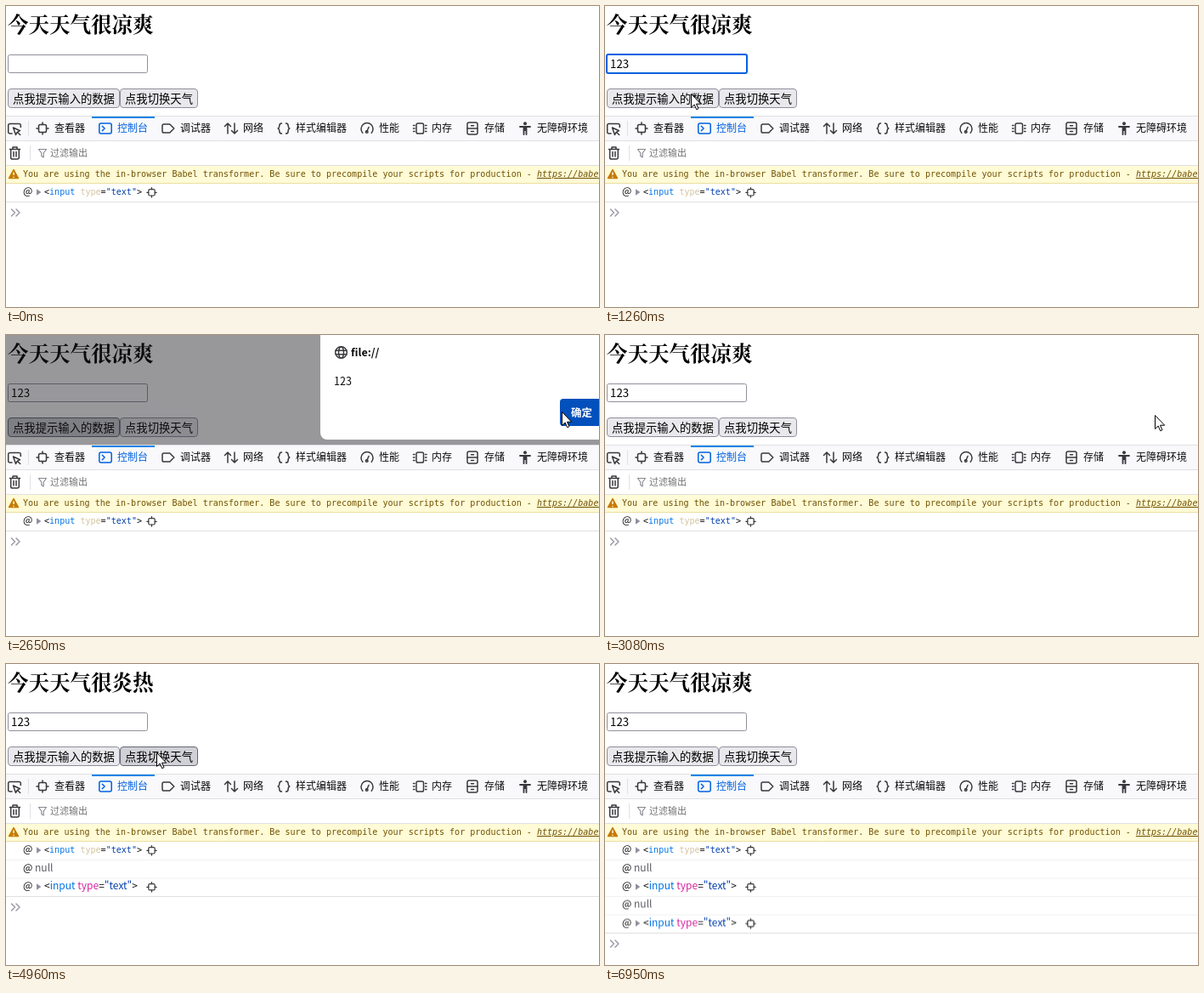
Recreate the animation shown at these times as an HTML page. Size 698 by 354 pixels, loop 7620 ms.

```html
<!DOCTYPE html>
<html lang="zh-CN">
<head>
<meta charset="utf-8">
<title>天气</title>
<style>
html, body { margin: 0; width: 100%; height: 100%; overflow: hidden; background: #fff; }
svg { display: block; }
text { font: 12px "Noto Sans CJK SC", "Noto Sans", sans-serif; fill: #0c0c0d; white-space: pre; }
.title { font: bold 24.5px "Noto Serif CJK SC", "Noto Sans CJK SC", serif; fill: #000; }
.form text { font-size: 13.333px; fill: #000; }
.mono text { font: 10.05px "DejaVu Sans Mono", monospace; }
.button { fill: #e9e9ed; stroke: #8f8f9d; }
.icon { fill: none; stroke: #38383d; stroke-width: 1.5; stroke-linecap: round; stroke-linejoin: round; }
.solid { fill: #38383d; stroke: none; }
.line { stroke: #e0e0e2; }
.faint { stroke: #f1f1f3; }
.tag { fill: #0074e8; }
.attr { fill: #d6249f; }
.pale { fill: #d3c4a0; }
.value { fill: #003eaa; }

/* one shared 7620 ms loop with hard changes */
.t { animation: 7620ms step-end infinite; }
.cursor { animation-name: cursor; }
.arrow { animation-name: arrow; }
.beam { animation-name: beam; }
.focus { animation-name: focus; }
.one { animation-name: one; }
.two { animation-name: two; }
.three { animation-name: three; }
.show { animation-name: show; }
.swap { animation-name: swap; }
.ok { animation-name: ok; }
.modal { animation-name: modal; }
.cool { animation-name: cool; }
.hot { animation-name: hot; }
.first { animation-name: first; }
.second { animation-name: second; }
.prompt { animation-name: prompt; }

@keyframes cursor {
  0% { transform: translate(603px, 333px); opacity: 0; }
  1.04% { transform: translate(603px, 333px); opacity: 1; animation-timing-function: steps(8); }
  9.96% { transform: translate(128px, 52px); opacity: 1; }
  11.02% { transform: translate(104px, 66px); }
  14.3% { transform: translate(103px, 70px); }
  15.35% { transform: translate(102px, 90px); }
  16.53% { transform: translate(101px, 103px); }
  17.45% { transform: translate(99px, 111px); }
  18.5% { transform: translate(98px, 115px); }
  24.01% { transform: translate(125px, 118px); animation-timing-function: steps(9); }
  33.59% { transform: translate(654px, 89px); }
  34.77% { transform: translate(654px, 90px); }
  40.41% { transform: translate(647px, 94px); animation-timing-function: steps(4); }
  44.61% { transform: translate(174px, 115px); }
  47.9% { transform: translate(174px, 111px); }
  48.95% { transform: translate(174px, 107px); }
  62.99% { transform: translate(175px, 106px); }
  64.04% { transform: translate(176px, 105px); }
  65.09% { transform: translate(177px, 104px); opacity: 1; }
  82.67% { transform: translate(190px, 112px); opacity: 1; animation-timing-function: steps(7); }
  90.15% { transform: translate(598px, 321px); opacity: 1; }
  91.2%, to { transform: translate(598px, 321px); opacity: 0; }
}
@keyframes arrow { 0% { opacity: 1; } 11.02% { opacity: 0; } 15.35%, to { opacity: 1; } }
@keyframes beam { 0% { opacity: 0; } 11.02% { opacity: 1; } 15.35%, to { opacity: 0; } }
@keyframes focus { 0% { opacity: 0; } 11.02% { opacity: 1; } 19.55%, to { opacity: 0; } }
@keyframes one { 0% { opacity: 0; } 12.07%, to { opacity: 1; } }
@keyframes two { 0% { opacity: 0; } 13.12%, to { opacity: 1; } }
@keyframes three { 0% { opacity: 0; } 14.3%, to { opacity: 1; } }
@keyframes show {
  0% { fill: #e9e9ed; }
  17.45% { fill: #d0d0d7; stroke: #676774; }
  19.55% { fill: #b1b1b9; stroke: #484851; }
  21.78% { fill: #d0d0d7; stroke: #676774; }
  40.41%, to { fill: #e9e9ed; stroke: #8f8f9d; }
}
@keyframes swap {
  0% { fill: #e9e9ed; stroke: #8f8f9d; }
  44.61% { fill: #d0d0d7; stroke: #676774; }
  53.28% { fill: #b1b1b9; stroke: #484851; }
  55.38% { fill: #d0d0d7; stroke: #676774; }
  74.93% { fill: #b1b1b9; stroke: #484851; }
  76.11% { fill: #d0d0d7; stroke: #676774; }
  83.72%, to { fill: #e9e9ed; stroke: #8f8f9d; }
}
@keyframes ok { 0% { fill: #0061e0; } 34.77% { fill: #0250bb; } 35.82%, to { fill: #053e94; } }
@keyframes modal { 0% { opacity: 0; } 21.78% { opacity: 1; } 40.41%, to { opacity: 0; } }
@keyframes cool { 0% { opacity: 1; } 55.38% { opacity: 0; } 76.11%, to { opacity: 1; } }
@keyframes hot { 0% { opacity: 0; } 55.38% { opacity: 1; } 76.11%, to { opacity: 0; } }
@keyframes first { 0% { opacity: 0; } 56.43%, to { opacity: 1; } }
@keyframes second { 0% { opacity: 0; } 77.16%, to { opacity: 1; } }
@keyframes prompt {
  0% { transform: translateY(0); }
  56.43% { transform: translateY(43px); }
  77.16%, to { transform: translateY(86px); }
}
</style>
</head>
<body>
<svg width="698" height="354" viewBox="0 0 698 354">
  <defs>
    <g id="target">
      <rect x="-4.5" y="-4.5" width="9" height="9" rx="1.8"/>
      <path d="M0-7v2.5M0 4.5V7M-7 0h2.5M4.5 0H7"/>
    </g>
    <g id="node">
      <text x="20" y="13">@</text>
      <path d="M36 6.2l5.4 3.8-5.4 3.8z" fill="#8f8f9d"/>
      <use href="#target" class="icon" transform="translate(171.5 10.3) scale(.82)" stroke-width="1.7"/>
    </g>
    <g id="pair">
      <text x="20" y="13">@ <tspan fill="#5c5c66">null</tspan></text>
      <path class="faint" d="M0 21.5h698"/>
      <g transform="translate(0 21.5)">
        <use href="#node"/>
        <text x="45" y="13">&lt;<tspan class="tag">input</tspan> <tspan class="attr">type</tspan>=<tspan class="value">"text"</tspan>&gt;</text>
      </g>
    </g>
  </defs>

  <g class="title">
    <text class="title t cool" x="2" y="31">今天天气很凉爽</text>
    <text class="title t hot" x="2" y="31">今天天气很炎热</text>
  </g>
  <g class="form">
    <rect x="2.5" y="57.5" width="164" height="21" rx="2" fill="#fff" stroke="#8f8f9d"/>
    <rect class="t focus" x="2" y="57" width="165" height="22" rx="2" fill="#fff" stroke="#0060df" stroke-width="2"/>
    <text x="6" y="73"><tspan>&#8203;</tspan></text>
    <text class="t one" x="6" y="73">1</text>
    <text class="t two" x="13.4" y="73">2</text>
    <text class="t three" x="20.8" y="73">3</text>
    <rect class="button t show" x="2.5" y="97.5" width="131" height="22" rx="3.5"/>
    <rect class="button t swap" x="134.5" y="97.5" width="91" height="22" rx="3.5"/>
    <text x="8" y="114">点我提示输入的数据</text>
    <text x="140" y="114">点我切换天气</text>
  </g>

  <g class="t modal">
    <path d="M0 0h698v129H0z" fill="#1c1b22" fill-opacity=".45"/>
    <path d="M370 0h328v123H378a8 8 0 0 1-8-8z" fill="#fff"/>
    <g class="icon" stroke-width="1.2" transform="translate(394.5 20.5)">
      <circle r="6.8"/>
      <ellipse rx="3" ry="6.8"/>
      <path d="M-6.5-2.3h13M-6.5 2.3h13"/>
    </g>
    <text x="406" y="25" style="font-weight:bold;font-size:12.5px">file://</text>
    <text x="386" y="59" style="font-size:12.5px">123</text>
    <path class="t ok" d="M698 75v32h-42a4 4 0 0 1-4-4V79a4 4 0 0 1 4-4z"/>
    <text x="665" y="96" style="font-weight:bold;font-size:12.5px;fill:#fff">确定</text>
  </g>

  <path d="M0 129h698v29H0z" fill="#f9f9fb"/>
  <path class="line" d="M0 129.5h698M0 158.5h698M26.5 135v18M28.5 164v18M0 187.5h698"/>
  <path d="M101 130h74v2h-74z" fill="#0a84e8"/>

  <g class="icon">
    <path d="M7 150H4.5a1.8 1.8 0 0 1-1.8-1.8v-8a1.8 1.8 0 0 1 1.8-1.8h11a1.8 1.8 0 0 1 1.8 1.8v2.3"/>
    <path d="M8.5 143l3 8.5 1.7-3.2 3.3-1.6zM13.5 148.5l3.2 3"/>
    <use href="#target" x="43" y="144"/>
    <g stroke="#0060df">
      <rect x="109.8" y="138" width="14.4" height="12" rx="2"/>
      <path d="M113.3 141.2l2.8 2.8-2.8 2.8"/>
    </g>
    <path d="M185.8 139h7l5 5-5 5h-7a1.8 1.8 0 0 1-1.8-1.8v-6.4a1.8 1.8 0 0 1 1.8-1.8z"/>
    <path d="M261 150v-12M257.5 141.5l3.5-3.5 3.5 3.5M269 138v12M265.5 146.5l3.5 3.5 3.5-3.5"/>
    <path d="M324.5 138c-2.3 0-2.6 1-2.6 2.6 0 2-.2 2.9-1.7 3.4 1.5.5 1.7 1.4 1.7 3.4 0 1.600.3 2.600 2.600 2.600M329.500 138c2.300 0 2.600 1 2.600 2.600 0 2 .2 2.900 1.700 3.400-1.500.5-1.700 1.400-1.700 3.400 0 1.600-.3 2.600-2.600 2.600"/>
    <path d="M419.800 149.200a7 7 0 1 1 10.400 0M424.800 147.500l2.200-5"/>
    <circle cx="424.700" cy="148" r="1.300"/>
    <rect x="483" y="138" width="8.500" height="12" rx="1.800"/>
    <path d="M479.500 140.500h1.500M479.500 144h1.500M479.500 147.500h1.500M493.500 140.500h1.500M493.500 144h1.500M493.500 147.500h1.500"/>
    <rect x="543" y="137" width="12" height="14" rx="2"/>
    <path d="M543 144h12M547.500 140.700h3M547.500 147.500h3"/>
    <path d="M605 142h12M611 142v4M609.500 142.500v8.500M612.500 142.500v8.500" stroke-width="1.800"/>
    <circle class="solid" cx="611" cy="138.300" r="2"/>
    <path d="M4.500 168.500h12M8 168v-2h5v2M5.700 169v9.200a1.800 1.800 0 0 0 1.800 1.800h6a1.800 1.800 0 0 0 1.800-1.800V169M9 171.500v5.500M12 171.500v5.500"/>
    <path d="M38.500 168.500h9l-3.300 4.500v5l-2.400-1.500V173z" style="stroke:#85858f;stroke-width:1.100"/>
  </g>
  <g>
    <text x="57" y="148">查看器</text>
    <text x="131" y="148" style="fill:#0060df">控制台</text>
    <text x="205" y="148">调试器</text>
    <text x="279" y="148">网络</text>
    <text x="341" y="148">样式编辑器</text>
    <text x="439" y="148">性能</text>
    <text x="501" y="148">内存</text>
    <text x="563" y="148">存储</text>
    <text x="625" y="148">无障碍环境</text>
    <text x="52" y="177" style="font-size:11px;fill:#737373">过滤输出</text>
  </g>

  <g class="mono">
    <path d="M0 188h698v20H0z" fill="#fffbd6"/>
    <path d="M0 208.500h698" stroke="#eadfa0"/>
    <path d="M9 192.500l5.500 10h-11z" fill="#c67a00" stroke="#c67a00" stroke-width="1.500" stroke-linejoin="round"/>
    <path d="M9 195.500v3.500M9 200.700v1.300" stroke="#fff" stroke-width="1.400"/>
    <text x="20" y="201" style="fill:#715100">You are using the in-browser Babel transformer. Be sure to precompile your scripts for production - <tspan font-style="italic" text-decoration="underline">https://babeljs.io/docs/setup/</tspan></text>
    <g transform="translate(0 209)">
      <use href="#node"/>
      <text x="45" y="13">&lt;<tspan class="tag">input</tspan> <tspan class="pale">type</tspan>=<tspan class="value">"text"</tspan>&gt;</text>
      <path class="faint" d="M0 21.500h698"/>
    </g>
    <g class="t first">
      <use href="#pair" y="230.500"/>
      <path class="faint" d="M0 273.500h698"/>
    </g>
    <use class="t second" href="#pair" y="273.500"/>
  </g>
  <g class="t prompt">
    <path class="line" d="M0 230.500h698"/>
    <path class="icon" d="M6.500 239l4 4-4 4M12 239l4 4-4 4" style="stroke:#9a9aa6"/>
  </g>

  <g class="t cursor">
    <path class="t arrow" d="M.5.500v16l3.700-3.500 2.500 5.700 2.300-1-2.500-5.500h5.200z" fill="#fff" stroke="#000"/>
    <path class="t beam" d="M-3-7.500h2.500l.5.500.5-.5H3M0-7V7M-3 7.500h2.500L0 7l.5.500H3" fill="none" stroke="#000"/>
  </g>
</svg>
</body>
</html>
```
